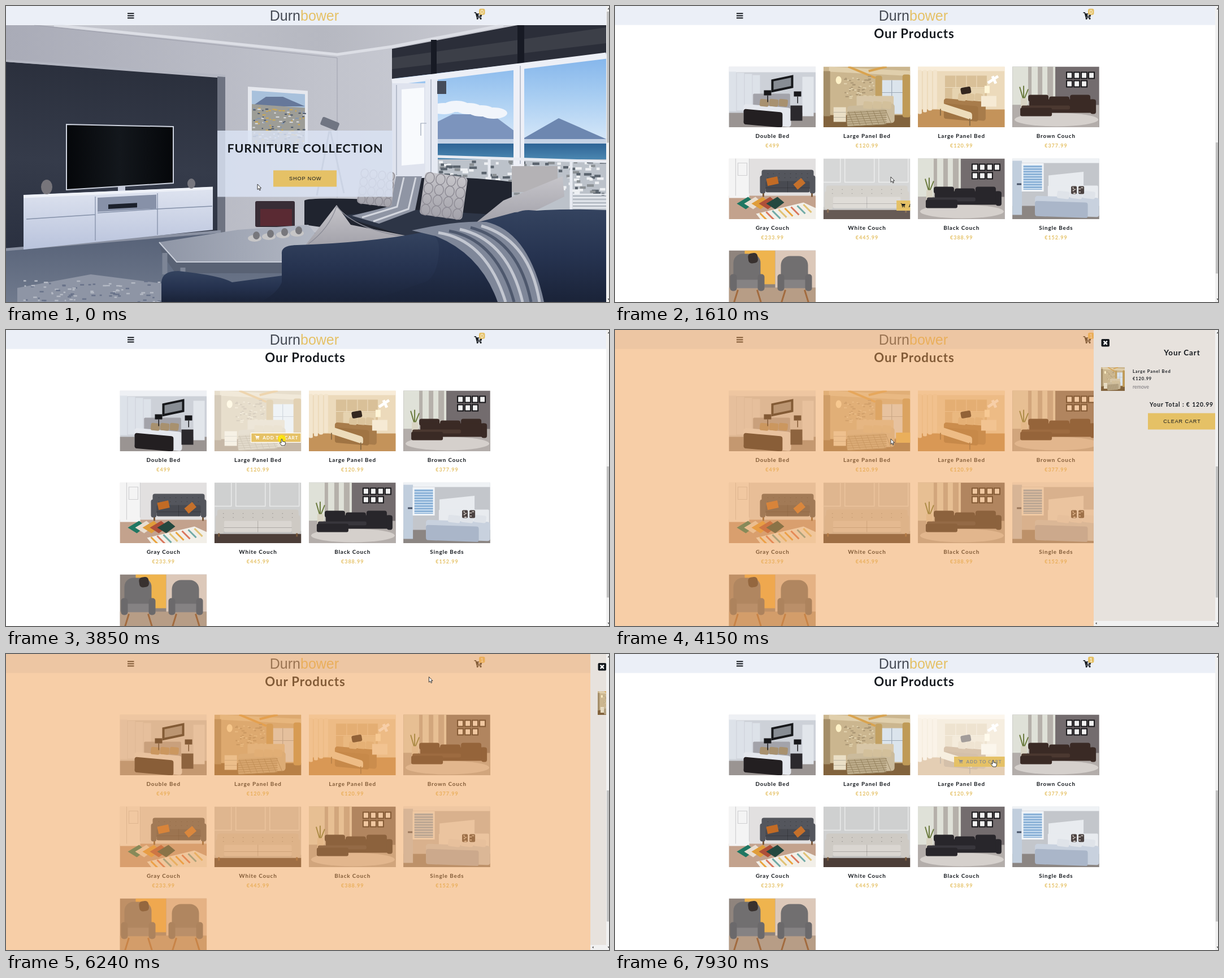
Write an HTML page that moves like this. It is 1067x525 px and loops after 8 s.

```html
<!DOCTYPE html>
<html lang="en">
<head>
<meta charset="utf-8">
<title>Furniture shop</title>
<style>
  html, body { margin: 0; width: 100%; height: 100%; overflow: hidden; background: #fff; }
  #stage { display: block; width: 1067px; height: 525px; }
  text { font-family: Lato, sans-serif; white-space: pre; }
  .plain { font-family: "Liberation Sans", Arial, sans-serif; }
</style>
</head>
<body>
<svg id="stage" viewBox="0 0 1067 525" xmlns="http://www.w3.org/2000/svg"></svg>
<script>
const GOLD = '#e5c166', INK = '#15191e', LOOP = 8000;

// ---- drawing helpers ----
const times = (n, f) => Array.from({ length: n }, (_, i) => f(i)).join('');
const rect = (fill, x, y, w, h, extra = '') =>
  `<rect fill="${fill}" x="${x}" y="${y}" width="${w}" height="${h}" ${extra}/>`;
// A box hung from its top left corner: r rounds, tilt turns, lean slants the horizontals (degrees).
const box = (fill, x, y, w, h, { r = 0, tilt = 0, lean = 0 } = {}) =>
  rect(fill, 0, 0, w, h, `rx="${r}" transform="translate(${x} ${y}) rotate(${tilt}) skewY(${lean})"`);
const path = (fill, d, extra = '') => `<path fill="${fill}" d="${d}" ${extra}/>`;
const line = (color, width, d) => `<path fill="none" stroke="${color}" stroke-width="${width}" d="${d}"/>`;
const oval = (fill, x, y, rx, ry = rx) => `<ellipse fill="${fill}" cx="${x}" cy="${y}" rx="${rx}" ry="${ry}"/>`;
const group = (id, body) => `<g id="${id}">${body}</g>`;
const fade = (id, dir, ...colors) => `<linearGradient id="${id}" x2="${+(dir === 'x')}" y2="${+(dir === 'y')}">`
  + colors.map((c, i) => `<stop offset="${i / (colors.length - 1)}" stop-color="${c}"/>`).join('') + '</linearGradient>';

function text(x, y, str, size, { anchor = 'start', weight = 700, fill = INK, gap = 0.89, cls = '', id = '' } = {}) {
  const shift = anchor === 'middle' ? gap / 2 : 0;
  return `<text ${id && `id="${id}"`} class="${cls}" x="${x + shift}" y="${y}" font-size="${size}"
    font-weight="${weight}" fill="${fill}" text-anchor="${anchor}" letter-spacing="${gap}">${str}</text>`;
}

function specks(seed, n, colors, x, y, w, h, size) {
  const next = () => (seed = (seed * 16807) % 2147483647) / 2147483647;
  next();
  return times(n, () => rect(colors[Math.floor(next() * colors.length)],
    (x + next() * w).toFixed(1), (y + next() * h).toFixed(1), (size * (0.5 + next())).toFixed(1), size / 2));
}

const cartIcon = (x, y, scale, plus) => `<g fill="${INK}" stroke="${INK}" transform="translate(${x} ${y}) scale(${scale})">
  <path fill="none" stroke-width="1.5" d="M0 1H2.8L5 10H12.6"/><path stroke="none" d="M3 2.4H14.6L13.2 8.4H4.6Z"/>
  <circle stroke="none" cx="5.8" cy="12" r="1.5"/><circle stroke="none" cx="11.8" cy="12" r="1.5"/>
  ${plus ? line('#ebeff7', 1.2, 'M9 3.3V7.5M6.9 5.4H11.1') : ''}</g>`;

// ---- living room ----
function cushion(x, y, size, tilt) {
  const step = size / 4;
  const rings = times(16, i => `<ellipse cx="${step * (i % 4 + 0.5)}" cy="${step * (Math.floor(i / 4) + 0.5)}"
    rx="${step * 0.42}" ry="${step * 0.5}" fill="none" stroke="#8f8d96" stroke-width="1.5"/>`);
  return `<g transform="translate(${x} ${y}) rotate(${tilt})">${box('url(#linen)', 0, 0, size, size, { r: 6 })}${rings}</g>`;
}

const backWalls = () => rect('url(#wall)', 0, 34, 1062, 491)
  + path('url(#ceil)', 'M60 34H1062L683 72L586 88Z')
  + line('#dcdee5', 5, 'M85 34L586 86L683 72L880 34') + line('#a0a2ae', 1, 'M50 34L586 92V340')
  + box('#6e7381', 374, 123, 14, 290) + box('url(#dark)', 0, 99, 374, 340, { lean: 4.3 })
  + line('#b3b6c1', 4, 'M0 97L388 124')
  + path('url(#floor)', 'M0 432L388 402H560V525H0Z') + line('#8b92a3', 5, 'M0 432L380 400')
  + path('#8e95a5', 'M20 500L150 476L275 492V525H20Z') + specks(7, 80, ['#b4b9c4', '#69738a'], 30, 486, 240, 38, 5);

const tvCorner = () => path('url(#screen)', 'M107 210L296 214V314L107 326Z', 'stroke="#ced3df" stroke-width="2"')
  + box('#c9cede', 198, 320, 13, 9)
  + path('url(#cabinet)', 'M31 335L366 321V397L31 432Z') + line('#eef1f8', 5, 'M31 338L366 323')
  + box('#8791a8', 162, 340, 104, 25, { lean: -3 }) + box('#1c212c', 181, 352, 51, 8, { lean: -3 })
  + line('#8490a8', 1.3, 'M158 338V416M268 332V406M36 378L158 370M162 367L268 360L365 355')
  + oval('#77757b', 72, 321, 10, 13) + oval('#77777f', 328, 315, 7, 9);

const artwork = () => box('#e6e8ee', 428, 143, 106, 110, { lean: 4 }) + box('#a8c1dc', 435, 150, 94, 98, { lean: 4 })
  + path('#66789a', 'M435 178L460 161H490L529 178Z') + box('#9d9d97', 435, 174, 94, 74, { lean: 4 })
  + specks(21, 150, ['#dcdde0', '#4a566b', '#cfa94f', '#8295b2'], 436, 180, 90, 68, 4)
  + line('#828794', 3, 'M572 222L550 336M574 222L598 332') + box('#707582', 561, 196, 32, 15, { r: 3, tilt: 22 });

const seaView = () => rect('url(#sky)', 690, 80, 372, 165)
  + path('#7c94bd', 'M764 205L790 192H860L900 222V245H764Z') + path('#6d87b0', 'M917 234L978 199L1062 236V245H917Z')
  + times(5, i => oval('#f1f5fb', 775 + i * 22, 178 + Math.abs(i - 1) * 4, 24, 10))
  + rect('#c6d3e6', 764, 236, 298, 8) + rect('url(#sea)', 764, 244, 298, 28)
  + rect('#bcc2ca', 764, 272, 298, 100) + specks(12, 170, ['#5b646e', '#eef0f3', '#8b9094'], 764, 274, 290, 58, 9);

const windowFrame = () => path('#2b2e39', 'M683 76L905 34H1062V84L683 129Z')
  + path('#44464f', 'M683 92L1062 38V66L683 112Z', 'opacity=".7"')
  + rect('#171a24', 752, 60, 10, 61) + rect('#171a24', 905, 34, 12, 68)
  + line('#eceff6', 11, 'M683 135L1062 88')
  + rect('#dfe3ee', 683, 137, 59, 185) + box('#f8fafd', 700, 148, 40, 135, { lean: -5 })
  + rect('#e6eaf3', 742, 130, 22, 185) + rect('#eef0f7', 898, 104, 19, 182)
  + line('#9aa3b5', 1.2, 'M691 140V300M752 130V310M910 106V280M734 230V208H744')
  + box('#454c5a', 763, 133, 16, 23)
  + line('#e8ebf2', 5, 'M764 267L1062 276M855 270V330M1000 276V365')
  + times(7, i => line('#eef1f6', 2, `M1003 ${334 + i * 6}H1062`));

const farSofa = () => box('#382d36', 441, 346, 70, 46, { r: 3 }) + box('#5a2a33', 450, 360, 56, 30)
  + path('#20242f', 'M528 345Q535 338 700 345L720 306Q800 300 895 312V400L700 412L528 388Z')
  + path('#2d3546', 'M590 372L700 360L895 372L850 408L720 412Z')
  + path('#8f95a4', 'M690 302H736L724 362L660 386L612 372L680 355Z')
  + line('#d4d7df', 3, 'M704 304L692 356L630 375M725 304L712 360L650 382')
  + cushion(628, 288, 62, 7) + cushion(742, 294, 76, 8)
  + rect('#b4b2b5', 895, 284, 81, 46) + rect('#cbc8ca', 925, 330, 16, 25);

const table = () => path('#596274', 'M272 425L302 452H490V474H300L276 440Z')
  + path('url(#board)', 'M271 419L410 397L535 388L560 420L500 455H302Z')
  + line('#c9ced9', 2, 'M271 419L302 454H490') + line('#7d8596', 9, 'M281 438V476M313 464V488')
  + times(4, i => oval('#c7c6c7', 440 + i * 25, 412 - i * 3, 12, 6) + oval('#77777c', 443 + i * 25, 407 - i * 3, 6, 7));

const nearSofa = () => path('url(#linen)', 'M985 302L988 338L910 376L832 384L880 345Z')
  + path('url(#blue)', 'M700 420L900 366Q980 358 1062 362V525H500Z')
  + path('url(#blue)', 'M897 378Q900 362 925 362L1062 372V525H945Z')
  + path('url(#linen)', 'M585 353L610 388L716 409L640 424H530Z') + line('#8a8b96', 1.2, 'M585 355Q572 395 535 422M585 355Q620 398 708 409')
  + path('url(#blue)', 'M275 490Q276 470 305 470Q380 478 400 490L490 478V525H275Z')
  + path('url(#blue)', 'M488 440Q486 424 515 424Q640 420 735 402Q768 400 766 435Q764 475 745 488L640 525H450Q480 510 488 490Z')
  + path('#7f8799', 'M718 398Q800 380 850 383Q925 400 952 525H870Q840 440 760 408Z')
  + times(5, i => line(i % 2 ? '#4e586d' : '#c3c7d1', 5, `M${765 + i * 19} ${402 - i * 3}Q${850 + i * 19} 415 ${884 + i * 15} 525`));

const room = () => [backWalls, tvCorner, artwork, seaView, windowFrame, farSofa, table, nearSofa].map(f => f()).join('');

// ---- product pictures, each 154 x 108 ----
const setting = (wall, floor, y) => rect(wall, 0, 0, 154, 108) + rect(floor, 0, y, 154, 108 - y);
const lamp = (color, x, y) => rect(color, x - 6, y, 13, 9) + rect(color, x, y + 9, 1.5, 12);
const drawers = (color, x, y) => rect(color, x, y, 22, 26) + line('#0003', 1, `M${x} ${y + 9}h22m-22 9h22`);

function bed(x, y, w, { sheet, cover, pillow, head, lean = 5 }) {
  const h = 34;
  return box(head, x + w * 0.2, y - 14, w * 0.78, 30, { r: 2 })
    + box(sheet, x, y + 4, w, h, { r: 5, lean })
    + times(3, i => box(pillow, x + w * (0.35 + i * 0.2), y - 5, w * 0.19, 13, { r: 3, tilt: 6 }))
    + box(cover, x, y + 13, w * 0.82, h * 0.8, { r: 4, lean });
}

function sofa(x, y, w, color, seat) {
  const arm = w * 0.1;
  return line('#7a5a3c', 3, `M${x + 6} ${y + 40}v8M${x + w - 6} ${y + 40}v8`)
    + box(color, x + 3, y, w - 6, 34, { r: 4 }) + box(seat, x + arm, y + 20, w - 2 * arm, 20, { r: 3 })
    + box(color, x, y + 10, arm, 32, { r: 4 }) + box(color, x + w - arm, y + 10, arm, 32, { r: 4 })
    + times(16, i => oval('#0004', x + 14 + (i % 8) * (w - 28) / 7, y + 7 + Math.floor(i / 8) * 7, 0.8))
    + line('#0003', 1, `M${x + w / 2} ${y + 20}v20M${x + arm} ${y + 32}h${w - 2 * arm}`);
}

const cornerSofa = (color, seat) => setting('#736c6e', '#b3adaa', 68) + rect('#dfe1d8', 0, 0, 76, 68)
  + times(3, i => rect('#b5b0aa', 28 + i * 17, 0, 6 + i * 2, 68))
  + times(7, i => rect('#f1f1f1', 96 + (i % 4) * 13, 10 + Math.floor(i / 4) * 15, 10, 11, 'stroke="#161518" stroke-width="2"'))
  + line('#6a7a3d', 2, 'M20 60L13 36M20 60L20 34M20 60L28 40') + rect('#d9d4c4', 15, 56, 11, 18)
  + oval('#d5d0cc', 78, 94, 74, 12)
  + times(3, i => box(color, 28 + i * 37, 50 + i % 2 * 3, 36, 12, { r: 4 }))
  + box(color, 30, 58, 116, 24, { r: 4 }) + box(seat, 16, 69, 86, 7, { r: 3 })
  + box(color, 14, 73, 56, 15, { r: 3 }) + box(color, 138, 58, 10, 26, { r: 4 });

const doubleBed = () => setting('#cdd1d8', '#9a9492', 82) + box('#eef0f4', 0, 0, 154, 10)
  + times(4, i => box('#dde2e9', i * 14, 9 + i * 2, 13, 70 - i * 3)) + box('#e2e6eb', 130, 18, 20, 70)
  + box('#17181b', 75, 23, 39, 23, { lean: -12 }) + box('#888d94', 79, 26, 31, 15, { lean: -12 })
  + bed(26, 62, 84, { sheet: '#e4e7ed', cover: '#231f21', pillow: '#a8916f', head: '#a3a3aa' })
  + lamp('#17171a', 121, 44) + lamp('#17171a', 68, 42) + rect('#2b292d', 109, 69, 21, 27);

const panelBed = () => setting('#cbb68f', '#82633d', 86) + box('#e0cfac', 10, 0, 144, 9, { lean: 3 })
  + line('#d9a34f', 4, 'M44 0L92 20M80 8L112 0') + rect('#a48e69', 0, 8, 12, 80)
  + specks(9, 60, ['#a99573', '#e2d3b0'], 36, 16, 54, 40, 4)
  + rect('#dbe4ec', 100, 24, 42, 60) + line('#9ba7b4', 1.2, 'M121 24V84M100 46H142')
  + box('#c2a061', 92, 16, 12, 66, { r: 4 }) + box('#bf9a57', 140, 14, 14, 76, { r: 4 })
  + bed(42, 66, 84, { sheet: '#cbbb9c', cover: '#bfae8d', pillow: '#d3c09b', head: '#d8c7a8', lean: -3 })
  + times(7, i => line('#96835f', 1, `M${44 + i * 11} ${80 - i * 0.5}l10 24M42 ${82 + i * 4}l70 -4`))
  + drawers('#eadfc6', 18, 72) + oval('#fff2c8', 27, 24, 5, 7);

const woodBed = () => setting('#ecdabb', '#c4935a', 76) + box('#f8ecd8', 0, 0, 154, 8)
  + times(4, i => box('#f3e5cd', i * 9, 6, 7, 78 - i * 3, { r: 2 })) + rect('#d9c098', 48, 16, 74, 42)
  + line('#efdfc3', 1, 'M67 16V58M86 16V58M104 16V58M48 37H122')
  + bed(46, 52, 74, { sheet: '#a87c4b', cover: '#a07443', pillow: '#dcc49c', head: '#e6d3b0' })
  + box('#34271f', 75, 38, 18, 12, { r: 3, tilt: -10 })
  + box('#eddcbb', 34, 62, 62, 13, { r: 4, lean: 18 }) + line('#8c6c45', 2, 'M40 75v12M92 92v13')
  + box('#f6ead4', 112, 52, 27, 19) + rect('#fff6d8', 118, 34, 9, 13) + line('#fff', 5, 'M124 29L142 17M132 17L138 30');

const grayCouch = () => setting('#e2e0e0', '#c3a28d', 66) + rect('#f4f4f4', 0, 0, 36, 70)
  + line('#cfcfd1', 1.2, 'M12 0V66M36 0V62M16 8H32V30H16Z')
  + sofa(55, 20, 98, '#54565d', '#484a51')
  + box('#c26b25', 66, 36, 20, 13, { tilt: -12 }) + box('#c5702b', 114, 46, 18, 12, { tilt: -40 })
  + times(5, i => path(['#1f7762', '#e8ddd0', '#df9d3a', '#ae4f39', '#24483f'][i], `M${14 + i * 13} 80l20 -12l12 10l-16 12Z`))
  + path('#f2efe8', 'M48 98L132 78L154 88V108H56Z')
  + times(8, i => line(['#e9a33c', '#d9765c', '#70aaa6', '#e1c376'][i % 4], 3, `M${55 + i * 11} ${97 - i * 2.2}l14 14`));

const whiteCouch = () => setting('#cfd0d0', '#4c3e38', 91) + rect('#bfbfbe', 0, 86, 154, 5)
  + times(3, i => rect('none', i * 60 - 22, -5, 52, 47, 'stroke="#e9eaea" stroke-width="1.5"'))
  + sofa(2, 48, 150, '#cecac4', '#dad6d1');

const singleBeds = () => setting('#c3c6cb', '#8c8683', 84) + box('#eff2f5', 0, 0, 154, 8) + rect('#c1cedd', 0, 4, 17, 96)
  + rect('#86aed5', 19, 10, 34, 46) + times(10, i => rect('#d3e4f4', 19, 11 + i * 4.6, 34, 1.8))
  + rect('none', 18, 10, 36, 47, 'stroke="#f2f5f8" stroke-width="3"') + rect('#455166', 8, 44, 8, 3)
  + box('#e8ebef', 64, 30, 62, 36, { lean: -6 })
  + bed(40, 62, 114, { sheet: '#c8d1de', cover: '#aab6c9', pillow: '#dfe3e9', head: '#e8ebef', lean: 2 })
  + times(2, i => box('#4b4241', 104 + i * 13, 49, 10, 14, { r: 2 })) + specks(3, 10, ['#d8d1cb'], 104, 50, 18, 11, 3);

const armchairs = () => setting('#8f847d', '#b79d86', 66) + rect('#efb44e', 28, 0, 54, 60) + rect('#dcc8b9', 82, 0, 72, 66)
  + times(2, i => {
    const x = 4 + i * 84;
    return line('#a26b3f', 3, `M${x + 12} 70l-8 26M${x + 46} 70l8 26`) + box('#716f70', x + 4, 6 + i * 4, 48, 56, { r: 16 })
      + box('#858283', x + 4, 52, 50, 15, { r: 5 }) + box('#6b696b', x - 2, 42, 12, 30, { r: 5 }) + box('#6b696b', x + 47, 42, 12, 30, { r: 5 });
  })
  + box('#38312f', 33, 6, 17, 18, { r: 6, tilt: -8 });

const products = [
  ['Double Bed', '499', doubleBed], ['Large Panel Bed', '120.99', panelBed], ['Large Panel Bed', '120.99', woodBed],
  ['Brown Couch', '377.99', () => cornerSofa('#3a2a25', '#4b3830')], ['Gray Couch', '233.99', grayCouch],
  ['White Couch', '445.99', whiteCouch], ['Black Couch', '388.99', () => cornerSofa('#28262b', '#38363c')],
  ['Single Beds', '152.99', singleBeds], ['', '', armchairs]
];

function product([title, price, draw], i) {
  const x = 201.5 + (i % 4) * 167.2, y = 107.5 + Math.floor(i / 4) * 163, mid = x + 76.8;
  const button = group('btn' + i, rect(GOLD, 0, 0, 90, 18)
    + group('label' + i, cartIcon(7.5, 4.7, 0.55) + text(21.5, 12, 'ADD TO CART', 8))
    + rect('none', 0.7, 0.7, 88.6, 16.6, `id="ring${i}" visibility="hidden" stroke="#fff" stroke-width="1.4"`));
  return `<svg x="${x}" y="${y}" width="153.6" height="107.5">${group('pic' + i, draw())}${button}</svg>`
    + (title && text(mid, y + 126, title, 9.85, { anchor: 'middle' })
      + text(mid, y + 143.5, '€' + price, 9, { anchor: 'middle', fill: GOLD, gap: 1 }));
}

// ---- page parts ----
const defs = '<defs>' + [
  fade('wall', 'x', '#a9abb7', '#c0c2cb', '#d2d4dc'), fade('ceil', 'x', '#c6c8d0', '#b6b8c1', '#d5d6dd'),
  fade('dark', 'y', '#2b303d', '#353b4a', '#2a3040'), fade('floor', 'y', '#566177', '#707a8d'),
  fade('screen', 'x', '#05070a', '#13171c', '#05070a'), fade('cabinet', 'y', '#dfe4f0', '#b9c3dc'),
  fade('sky', 'y', '#7fb2ea', '#a9cef2', '#d9e9f9'), fade('sea', 'y', '#2f6496', '#4a86b0'),
  fade('linen', 'y', '#c6c5ca', '#a3a2aa'), fade('board', 'x', '#8f96a6', '#b4b9c5'),
  fade('blue', 'y', '#34435f', '#263350', '#1a2338')
].join('') + '</defs>';

const hero = group('hero', room()
  + rect('#dce4f6', 374, 221, 310, 117.5, 'opacity=".82"')
  + text(529, 260, 'FURNITURE COLLECTION', 21.5, { anchor: 'middle' })
  + rect(GOLD, 473.5, 292, 111, 28, `id="shop" stroke="${GOLD}"`)
  + rect('none', 474.3, 292.8, 109.4, 26.4, 'id="focus" stroke="#3a3a3c" stroke-width=".8"')
  + text(529.4, 309, 'SHOP NOW', 9.1, { anchor: 'middle', weight: 400, cls: 'plain', id: 'shopText' }));

const shelf = group('shelf', rect('#fff', 0, 34, 1062, 491)
  + text(529, 57, 'Our Products', 22.2, { anchor: 'middle' }) + products.map(product).join(''));

const header = rect('#ebeff7', 0, 0, 1062, 33.7) + times(3, i => rect(INK, 215, 12.3 + i * 4, 11.5, 2))
  + text(521, 26, 'Durn', 25, { anchor: 'end', weight: 400, fill: '#454a54', gap: 0, cls: 'plain' })
  + text(521, 26, 'bower', 25, { weight: 400, fill: GOLD, gap: 0, cls: 'plain' })
  + cartIcon(828.5, 10.8, 0.98, true) + rect(GOLD, 837, 4.8, 10.5, 11, 'rx="3"')
  + text(842.2, 13.7, '0', 9.5, { anchor: 'middle', weight: 400, fill: '#fff', gap: 0, id: 'count' });

const drawer = group('drawer', rect('#e7e2dd', 847, 0, 215, 525)
  + rect(INK, 860.5, 16, 14.5, 13.5, 'rx="2"') + line('#fff', 2.4, 'M864.7 19.7L870.8 25.8M870.8 19.7L864.7 25.8')
  + text(1003, 45, 'Your Cart', 13.5, { anchor: 'middle' })
  + `<svg x="860" y="66" width="42" height="42" viewBox="0 0 154 108" preserveAspectRatio="none">${panelBed()}</svg>`
  + text(916, 75.5, 'Large Panel Bed', 7.6) + text(916, 89, '€120.99', 7.5)
  + text(916, 104, 'remove', 8.8, { weight: 400, fill: '#77757a', gap: 0 })
  + text(946, 136, 'Your Total : € 120.99', 10.35) + rect(GOLD, 943, 147.5, 121, 29)
  + text(1003, 165, 'CLEAR CART', 9.1, { anchor: 'middle', weight: 400, cls: 'plain' })
  + rect('#f1f1f1', 847, 516, 215, 9) + path('#555', 'M850 520.3L852.5 518.3V522.3Z'));

const scrollbar = rect('#f1f1f1', 1062, 0, 5, 525) + rect('#c1c1c1', 1063, 10, 4, 232.5, 'id="thumb"')
  + path('#444', 'M1064.5 6L1067 3V6ZM1064.5 519L1067 522V519Z');

const pointer = group('pointer', oval('#ffe600', 0, 0, 7).replace('<ellipse', '<ellipse id="press" opacity=".85"')
  + path('#fff', 'M0 0V9.6L2.2 7.6L3.8 11L5.3 10.3L3.8 7H6.6Z', 'id="arrow" stroke="#222" stroke-width=".9"')
  + path('#fff', 'M-1 1Q0 -.6 1 1V4.4L4.8 5.4Q6.4 5 6.4 6.8V9L5 12H-.2L-3.6 7.6Q-3.8 6 -2.4 6.3L-1 7.4Z',
    'id="hand" stroke="#222" stroke-width=".9"'));

document.getElementById('stage').innerHTML = defs + hero + shelf + header
  + rect('rgb(240,157,81)', 0, 0, 1062, 525, 'id="veil" opacity=".5"') + drawer + scrollbar + pointer;

// ---- motion ----
const $ = id => document.getElementById(id);
const set = (id, name, value) => $(id).setAttribute(name, value);
const show = (id, on) => set(id, 'visibility', on ? 'inherit' : 'hidden');
const ramp = (t, start, span = 300) => Math.min(1, Math.max(0, (t - start) / span));
const mix = (a, b, k) => `color-mix(in srgb, ${b} ${k * 100}%, ${a})`;

const linear = k => k, easeIn = k => k * k, sharpIn = k => k ** 3, easeOut = k => 1 - (1 - k) ** 2;
const easeBoth = k => k < 0.5 ? 2 * k * k : 1 - 2 * (1 - k) ** 2;

const JUMP = 1450, ADDED = 3860, LEFT = 3935, CLOSE = 5980;
const moves = [
  { from: 830, to: 1300, x: 488, y: 303, ease: linear },
  { from: 2300, to: 3080, x: 488, y: 193, ease: easeOut },
  { from: 4200, to: 5380, x: 766, y: 21, ease: easeBoth },
  { from: 5930, to: 6390, x: 709, y: 84, ease: sharpIn },
  { from: 6700, to: 7760, x: 669, y: 188, ease: easeIn }
];
const clicks = [{ from: 1340, to: JUMP }, { from: 3770, to: LEFT }, { from: 5780, to: 5930 }];
const hands = [{ from: 1160, to: JUMP }, { from: 3080, to: LEFT }, { from: 7760, to: LOOP }];
// Pointer over a picture, and when it reaches that picture's button.
const hovers = [
  { i: 5, from: 1530, to: 2413, button: LOOP },
  { i: 1, from: 2800, to: LEFT, button: 3080 },
  { i: 2, from: 7420, to: LOOP, button: 7780 }
];
const during = (t, spans) => spans.some(s => t >= s.from && t < s.to);

function place(t) {
  return moves.reduce((p, m) => {
    const k = m.ease(ramp(t, m.from, m.to - m.from));
    return { x: p.x + (m.x - p.x) * k, y: p.y + (m.y - p.y) * k };
  }, { x: 445, y: 316 });
}

function hoverCard(t, { i, from, to, button }) {
  const k = ramp(t, from) - ramp(t, to), color = mix(INK, '#fff', ramp(t, button));
  set('pic' + i, 'opacity', 1 - 0.55 * k);
  set('btn' + i, 'transform', `translate(${153.6 - 89.5 * k} 74.5)`);
  for (const part of $('label' + i).children) {
    part.style.fill = color;
    if (part.tagName === 'g') part.style.stroke = color;
  }
}

function render(t) {
  const down = t >= JUMP;
  show('hero', !down);
  show('shelf', down);
  set('thumb', 'y', down ? 242 : 10);

  const lit = ramp(t, 1100, 220);
  set('shop', 'fill-opacity', 1 - lit);
  $('shopText').style.fill = mix(INK, GOLD, lit);
  show('focus', !down && t >= clicks[0].from);

  hovers.forEach(h => hoverCard(t, h));
  show('label1', down && t < LEFT);
  show('ring1', during(t, [clicks[1]]));

  const open = ramp(t, ADDED, 280) - ramp(t, CLOSE);
  show('veil', t >= ADDED && t < CLOSE + 300);
  show('drawer', open > 0);
  set('drawer', 'transform', `translate(${215 * (1 - open)} 0)`);
  $('count').textContent = t < ADDED ? '0' : '1';

  const { x, y } = place(t), hand = during(t, hands);
  set('pointer', 'transform', `translate(${x.toFixed(1)} ${y.toFixed(1)})`);
  show('press', during(t, clicks));
  show('hand', hand);
  show('arrow', !hand);
}

products.forEach((_, i) => set('btn' + i, 'transform', 'translate(160 74.5)'));
const begin = performance.now();
function tick() {
  render((performance.now() - begin) % LOOP);
  requestAnimationFrame(tick);
}
tick();
</script>
</body>
</html>
```
